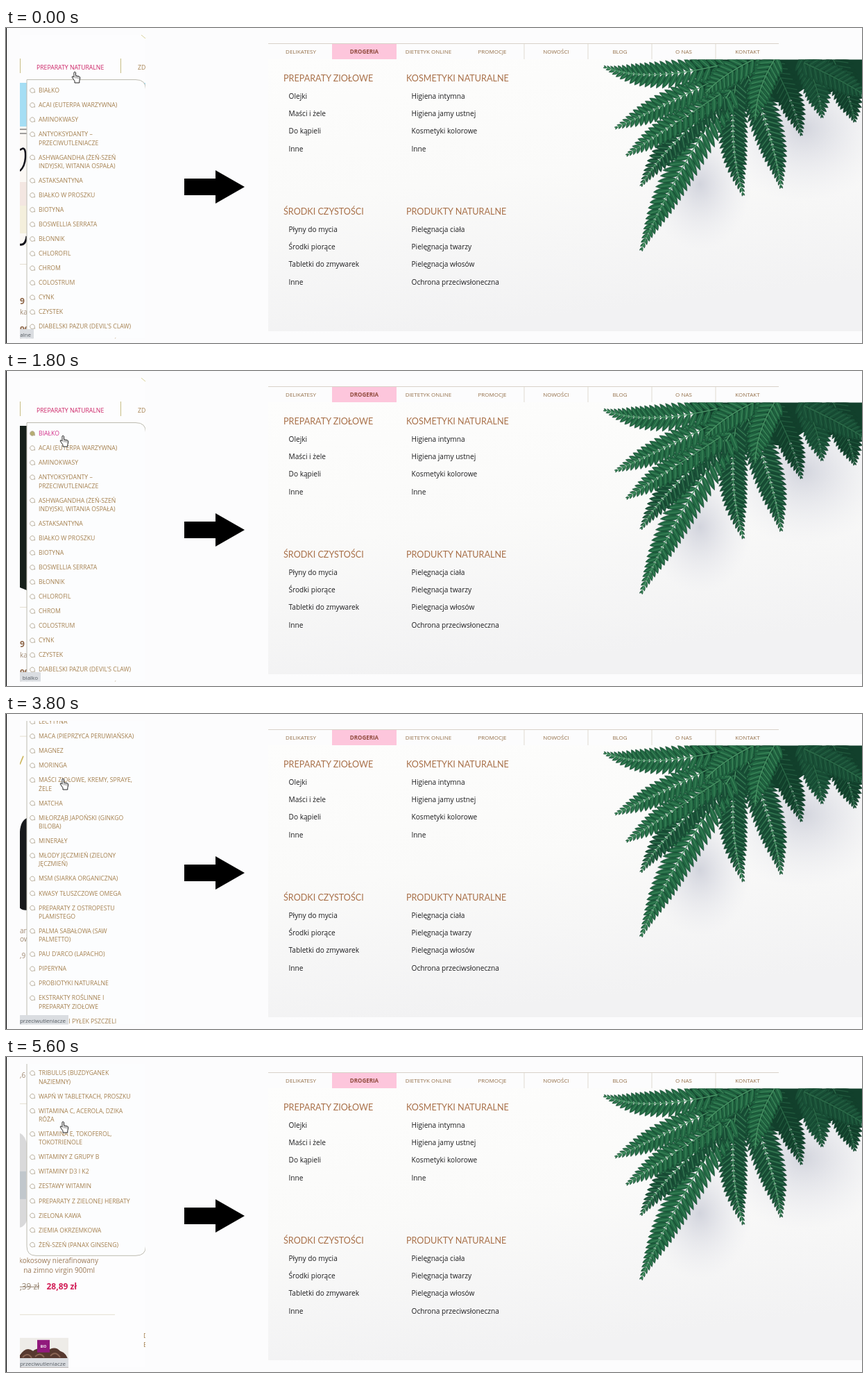
Write an HTML page that moves like this. It is 1234 by 454 pixels and loops after 5800 ms.

```html
<!DOCTYPE html>
<html lang="pl">
<head>
<meta charset="utf-8">
<title>Menu</title>
<style>
html, body { margin: 0; width: 100%; height: 100%; overflow: hidden; background: #fcfcfd; }
svg { display: block; width: 1234px; height: 454px; font-family: "Open Sans", sans-serif; }
</style>
</head>
<body>
<svg id="stage" viewBox="0 0 1234 454" xmlns="http://www.w3.org/2000/svg"></svg>
<script>
const LOOP = 5800, STEP = 200;
const BROWN = '#a5804f', PINK = '#cc2366';
const ROW = 21.05, EXTRA = 12.3, FIRST = 90;

// A bar marks the second line of an entry.
const items = `BIAŁKO;ACAI (EUTERPA WARZYWNA);AMINOKWASY;ANTYOKSYDANTY –|PRZECIWUTLENIACZE
ASHWAGANDHA (ŻEŃ-SZEŃ|INDYJSKI, WITANIA OSPAŁA);ASTAKSANTYNA;BIAŁKO W PROSZKU;BIOTYNA
BOSWELLIA SERRATA;BŁONNIK;CHLOROFIL;CHROM;COLOSTRUM;CYNK;CZYSTEK
DIABELSKI PAZUR (DEVIL'S CLAW);DONG QUAI (DZIĘGIEL CHIŃSKI);EKSTRAKT Z OREGANO
ENZYMY TRAWIENNE;FORSKOLINA (POKRZYWA|INDYJSKA);GUARANA (PAULINIA GUARANA)
JAGODY GOJI (KOLCOWÓJ|POSPOLITY);JOD, KELP, MORSZCZYN;KOCI PAZUR (CAT'S CLAW);KOENZYM Q10
KOLAGEN, GLUKOZAMINA,|CHONDROITYNA;KURKUMA (OSTRYŻ DŁUGI);KOMPLEKSY WITAMIN I|MINERAŁÓW
KRZEM;KWAS FOLIOWY;KWAS HIALURONOWY;KWAS KAPRYLOWY;LECYTYNA;MACA (PIEPRZYCA PERUWIAŃSKA)
MAGNEZ;MORINGA;MAŚCI ZIOŁOWE, KREMY, SPRAYE,|ŻELE;MATCHA;MIŁORZĄB JAPOŃSKI (GINKGO|BILOBA)
MINERAŁY;MŁODY JĘCZMIEŃ (ZIELONY|JĘCZMIEŃ);MSM (SIARKA ORGANICZNA)
KWASY TŁUSZCZOWE OMEGA;PREPARATY Z OSTROPESTU|PLAMISTEGO;PALMA SABAŁOWA (SAW|PALMETTO)
PAU D'ARCO (LAPACHO);PIPERYNA;PROBIOTYKI NATURALNE;EKSTRAKTY ROŚLINNE I|PREPARATY ZIOŁOWE
PROPOLIS I PYŁEK PSZCZELI;PROSZEK ZASADOWY;CORDYCEPS, REISHI, SHITAKE,|CHAGA, MITAKE
RESWERATROL (RDEST|OSTROKOŃCZYSTY);SELEN;SPIRULINA, CHLORELLA W|PROSZKU I TABLETKACH
SREBRO KOLOIDALNE;TRAGANEK (ASTRAGALUS);TRIBULUS (BUZDYGANEK|NAZIEMNY)
WAPŃ W TABLETKACH, PROSZKU;WITAMINA C, ACEROLA, DZIKA|RÓŻA;WITAMINA E, TOKOFEROL,|TOKOTRIENOLE
WITAMINY Z GRUPY B;WITAMINY D3 I K2;ZESTAWY WITAMIN;PREPARATY Z ZIELONEJ HERBATY
ZIELONA KAWA;ZIEMIA OKRZEMKOWA;ŻEŃ-SZEŃ (PANAX GINSENG)`.split(/[;\n]/);

// y is the middle of the capital letters
const text = (x, y, s, size, fill, more = '') =>
  `<text x="${x}" y="${(y + size * .36).toFixed(2)}" font-size="${size}" fill="${fill}" ${more}>${s}</text>`;
const rect = (x, y, w, h, fill, more = '') =>
  `<rect x="${x}" y="${y}" width="${w}" height="${h}" fill="${fill}" ${more}/>`;
const path = (d, fill, more = '') => `<path d="${d}" fill="${fill}" ${more}/>`;
const bold = 'font-weight="700"', mid = 'text-anchor="middle"', end = 'text-anchor="end"';

function list() {
  let y = FIRST;
  return items.map((s, i) => {
    const out = `<g id="i${i}" class="item" fill="${BROWN}">` +
      path(`M40 ${y + 2.6}A3.3 3.3 0 1 1 41.2 ${y + .6}L41.6 ${y + 3}Z`, 'none', 'class="dot" stroke="#b3a893" stroke-width=".9"') +
      s.split('|').map((l, k) => text(47, y + k * EXTRA, l, 8.7, 'inherit').replace('fill="inherit"', '')).join('') + '</g>';
    y += ROW + (s.includes('|') ? EXTRA : 0);
    return out;
  }).join('');
}

// Page seen beside and below the drop-down
function page() {
  const strip = [
    [394, '9 zł', 1], [409, 'ka'], [435, '999', 1], [450, 'ko'], [477, '9 zł', 1], [492, 'er'],
    [519, '99', 1], [533, 'er'], [561, '29', 1], [574, 'yłk'], [599, 'AT', 1], [613, 'aw'],
    [638, 'BA', 1], [651, 'ien'], [676, 'P', 1], [691, 'ry'], [715, 'RC', 1], [729, 'ni'],
    [753, 'NI', 1], [767, 'yłk'], [792, 'za'], [808, 'uk'], [824, 'a c'],
    [1139, 'an'], [1151, 'ow'], [1175, ',9'], [1441, 'sk'], [1454, 'D.'], [1478, ',6']];
  const line = (y, x = 30) => rect(20, y, x - 20, 1, '#e4dfd0');
  return `<g id="bannerA">${rect(20, 79, 181, 63, '#a5def4')}${rect(20, 142, 12, 173, '#fbf8f4')}` +
      path('M20 146h10M20 152h10', 'none', 'stroke="#444" stroke-width="1"') +
      path('M20 176Q29 168 28 187Q27 200 20 206', 'none', 'stroke="#15151c" stroke-width="2.6"') +
      rect(20, 222, 10, 34, '#f3e6e1') + rect(20, 256, 10, 40, '#f4efdc') +
      path('M20 312Q28 314 30 300', 'none', 'stroke="#15151c" stroke-width="3"') + '</g>' +
    `<g id="bannerB">${path('M20 79H30V316L20 312Z', '#17201b')}</g>` +
    line(340) + line(858) + line(1518) + line(1822, 157) +
    strip.map(([y, s, b]) => text(20, y, s, b ? 12 : 10, b ? '#8d6546' : '#a08a72', b ? bold : '')).join('') +
    path('M20 899L25 887', 'none', 'stroke="#cdb65c" stroke-width="1.6"') +
    path('M31 976Q21 980 20 996V1106Q24 1110 31 1109Z', '#17191c') +
    path('M20 1288H28V1388H20Z', '#dedfe1') + rect(24, 1315, 6, 60, '#b9bbbf') +
    path('M20 1561Q28 1564 31 1580V1685Q27 1696 20 1697Z', '#d9d9da') +
    rect(20, 1616, 9, 40, '#c1c7cc') +
    text(133, 1745, 'kokosowy nierafinowany', 10, '#9c7a58', end) +
    text(128, 1759, 'na zimno virgin 900ml', 10, '#9c7a58', end) +
    text(48, 1782, ',39 zł', 11.8, '#94826e', end) + rect(20, 1782, 28, 1, '#94826e') +
    text(58.5, 1782, '28,89 zł', 12, '#d21f58', bold) +
    rect(20, 1856, 70, 60, '#eeece8') +
    path('M20 1881Q29 1867 39 1875Q49 1867 58 1876Q70 1866 78 1875Q88 1878 90 1890V1916H20Z', '#57392f') +
    path('M24 1884q8-8 13 1M42 1883q7-7 13 1M64 1882q7-8 14 2', 'none', 'stroke="#8a6554" stroke-width="2"') +
    rect(45, 1859, 18, 18, '#91197c') + text(54, 1869, 'BIO', 4.6, '#fff', bold + ' ' + mid) +
    text(198, 1853, 'D', 9.5, BROWN) + text(198, 1866, 'E', 9.5, BROWN);
}

// One fern frond from its tip along a quadratic curve, leaflets on both sides
function frond(x0, y0, cx, cy, x1, y1, w, n, fill, rib) {
  let leaves = '', veins = '';
  for (let i = n; i >= 0; i--) {
    const t = i / n, u = 1 - t;
    const x = u * u * x0 + 2 * u * t * cx + t * t * x1, y = u * u * y0 + 2 * u * t * cy + t * t * y1;
    const dir = Math.atan2(u * (y0 - cy) + t * (cy - y1), u * (x0 - cx) + t * (cx - x1));
    const len = w * (.16 + .84 * Math.sin(Math.min(1, t * 1.35) * Math.PI / 2));
    const wide = Math.min(5.2, len * .26);
    for (const side of [-1, 1]) {
      const a = dir + side * (.45 + .5 * Math.min(1, t * 3));
      const c = Math.cos(a), s = Math.sin(a);
      const p = (f, h) => `${(x + c * len * f - s * h).toFixed(1)} ${(y + s * len * f + c * h).toFixed(1)}`;
      leaves += `M${p(0, -1)}C${p(.2, -wide)} ${p(.65, -wide)} ${p(1, 0)}C${p(.65, wide)} ${p(.2, wide)} ${p(0, 1)}Z`;
      veins += `M${p(.05, 0)}L${p(.75, -.6)}`;
    }
  }
  const stem = `M${x0} ${y0}Q${cx} ${cy} ${x1} ${y1}`;
  return path(leaves, fill, 'stroke="#123f2a" stroke-width=".5"') +
    path(veins, 'none', `stroke="${rib}" stroke-width="1.1" opacity=".65"`) +
    path(stem, 'none', `stroke="${rib}" stroke-width="1.4"`);
}

function fern() {
  const deep = '#12402c', dark = '#195037', green = '#226843', rib = '#4c9868', dim = '#2c6b49';
  return '<g clip-path="url(#photo)">' +
    '<ellipse cx="1150" cy="145" rx="125" ry="105" fill="url(#shade)"/>' +
    '<ellipse cx="1000" cy="225" rx="75" ry="95" fill="url(#shade)"/>' +
    path('M985 45H1234V92L1205 84L1180 98L1150 88L1120 108L1085 104L1050 122L1022 108L1000 88Z', deep) +
    frond(1223, 132, 1215, 90, 1190, 40, 28, 14, deep, dim) +
    frond(1176, 126, 1172, 85, 1150, 40, 26, 13, dark, dim) +
    frond(1240, 98, 1205, 75, 1150, 50, 24, 14, dark, dim) +
    frond(1146, 152, 1135, 105, 1105, 50, 24, 15, deep, dim) +
    frond(1117, 227, 1105, 150, 1068, 65, 30, 22, dark, rib) +
    frond(1062, 238, 1040, 165, 1052, 80, 27, 21, dark, rib) +
    frond(917, 317, 955, 225, 1045, 90, 30, 29, green, rib) +
    frond(917, 225, 948, 172, 1035, 100, 25, 20, dark, rib) +
    frond(897, 182, 945, 150, 1030, 95, 24, 19, green, rib) +
    frond(881, 143, 935, 118, 1022, 75, 24, 19, green, rib) +
    frond(865, 57, 925, 80, 1035, 52, 25, 21, green, rib) +
    frond(1010, 92, 1035, 65, 1085, 42, 26, 12, green, rib) +
    frond(1080, 130, 1082, 85, 1110, 42, 25, 13, green, rib) + '</g>';
}

function shop() {
  const tabs = [[425, 'DELIKATESY'], [609, 'DIETETYK ONLINE'], [701, 'PROMOCJE'], [793, 'NOWOŚCI'],
    [885, 'BLOG'], [977, 'O NAS'], [1069, 'KONTAKT']];
  const groups = [
    [400, 72, 'PREPARATY ZIOŁOWE', 'Olejki', 'Maści i żele', 'Do kąpieli', 'Inne'],
    [577, 72, 'KOSMETYKI NATURALNE', 'Higiena intymna', 'Higiena jamy ustnej', 'Kosmetyki kolorowe', 'Inne'],
    [400, 264, 'ŚRODKI CZYSTOŚCI', 'Płyny do mycia', 'Środki piorące', 'Tabletki do zmywarek', 'Inne'],
    [577, 264, 'PRODUKTY NATURALNE', 'Pielęgnacja ciała', 'Pielęgnacja twarzy', 'Pielęgnacja włosów', 'Ochrona przeciwsłoneczna']];
  return rect(378, 45, 856, 392, 'url(#wall)') + fern() +
    rect(378, 22, 736, 1, '#d9d2c9') + rect(470, 23, 93, 22, '#fdc6dc') +
    [747, 839, 931, 1023].map(x => rect(x - .5, 23, 1, 22, '#e0dad2')).join('') +
    tabs.map(([x, s]) => text(x, 34.3, s, 8, '#94704a', mid)).join('') +
    text(516.5, 34.3, 'DROGERIA', 8, '#8f4a3c', mid + ' ' + bold) +
    groups.map(([x, y, head, ...rows]) =>
      text(x, y, head, 12.6, '#a9714a', 'font-family="Lato, sans-serif"') +
      rows.map((s, i) => text(x + 7.5, y + 26 + i * 25.4, s, 10.13, '#1c1c1e')).join('')).join('');
}

const stage = document.getElementById('stage');
stage.innerHTML = `<defs>
  <clipPath id="panel"><rect x="20" y="10" width="181" height="437.5"/></clipPath>
  <clipPath id="photo"><rect x="378" y="45.5" width="856" height="391.5"/></clipPath>
  <linearGradient id="wall" x1="0" y1="0" x2=".25" y2="1">
    <stop offset="0" stop-color="#fdfdfc"/><stop offset=".5" stop-color="#fafaf9"/><stop offset="1" stop-color="#f2f2f3"/>
  </linearGradient>
  <radialGradient id="shade">
    <stop offset="0" stop-color="#b9bccb" stop-opacity=".6"/><stop offset="1" stop-color="#dcdde6" stop-opacity="0"/>
  </radialGradient>
</defs>` +
  rect(0, 0, 1234, 454, '#fcfcfd') + rect(0, 0, 1, 454, '#000') + shop() +
  path('M257 217H302V205L344 229L302 253V241H257Z', '#000') +
  `<g clip-path="url(#panel)">${rect(20, 10, 181, 438, '#fdfdfe')}<g id="scroll">` + page() +
  path('M195 10L201 15', 'none', 'stroke="#d8d09a" stroke-width="1"') +
  rect(20, 44, 1, 21, '#c8bd84') + rect(165, 44, 1, 21, '#c8bd84') +
  text(44, 57, 'PREPARATY NATURALNE', 8.7, PINK, 'id="title"') + text(190, 57, 'ZDROWIE', 8.7, BROWN) +
  path('M30 74.5H187Q201.5 74.5 201.5 88V1724Q201.5 1737.5 187 1737.5H43Q30 1737.5 30 1724Z', '#fcfdfe', 'stroke="#bdbbb0" stroke-width="1"') +
  list() + '</g>' +
  `<g id="status">${rect(0, 434, 20, 14, '#dadde1', 'id="statusBox"')}${text(0, 442, '', 8, '#555b62', 'id="url" ' + end)}</g></g>` +
  `<g id="tip">${rect(105.5, 64.5, 86, 17, '#fff', 'stroke="#6b6b6b"')}${text(110.5, 73, 'Preparaty naturalne', 8.2, '#4c4c4c')}</g>` +
  '<g id="hand">' + path('M-3-7q1.2-1.7 2.5 0v4.6l4.6 1.1q1.9.6 1.7 2.2l-1 4.6v2.5h-6.800v-2.500l-3.600-5.300q-.6-1.9 1.4-1.300l1.2 1.300z', '#fff', 'stroke="#222" stroke-width="1" stroke-linejoin="round"') +
  path('M-.3 1.500v-3.500M1.800 1.800v-3M3.800 2v-2.500', 'none', 'stroke="#222" stroke-width=".6"') + '</g>';

const $ = id => document.getElementById(id);
const show = (id, on) => $(id).setAttribute('visibility', on ? 'visible' : 'hidden');

// Linear value between [time, value] keys
function along(keys, t) {
  const i = keys.findIndex(k => k[0] > t);
  if (i < 0) return keys[keys.length - 1][1];
  if (i === 0) return keys[0][1];
  const [a, p] = keys[i - 1], [b, q] = keys[i];
  return p + (q - p) * (t - a) / (b - a);
}
const scrollKeys = [[2000, 0], [2400, 120.5], [3000, 483.4], [3800, 826.4], [4600, 1208.5], [5600, 1451.2]];
const handX = [[0, 101], [400, 99], [1400, 99], [1800, 84]];
const handY = [[0, 71], [400, 62], [1400, 62], [1800, 101]];

function hover(index, on) {
  const g = $('i' + index);
  g.setAttribute('fill', on ? '#d3308a' : BROWN);
  g.querySelector('.dot').setAttribute('fill', on ? '#b5ad72' : 'none');
}

function draw(time) {
  const t = Math.floor(time % LOOP / STEP) * STEP;
  $('scroll').setAttribute('transform', `translate(0 ${-along(scrollKeys, t)})`);
  $('hand').setAttribute('transform', `translate(${along(handX, t)} ${along(handY, t)})`);
  show('tip', t >= 1000 && t < 1400);
  show('bannerA', t < 1800);
  show('bannerB', t >= 1800);
  hover(0, t >= 1800 && t < 2200);
  hover(3, t >= 2200);
  const [url, x] = t < 1800 ? ['preparaty-naturalne', 36] : t < 2200 ? ['bialko', 46] : ['przeciwutleniacze', 86];
  $('url').textContent = url;
  $('url').setAttribute('x', x);
  $('statusBox').setAttribute('width', x + 4);
}

function tick() {
  draw(performance.now());
  requestAnimationFrame(tick);
}
tick();
</script>
</body>
</html>
```
